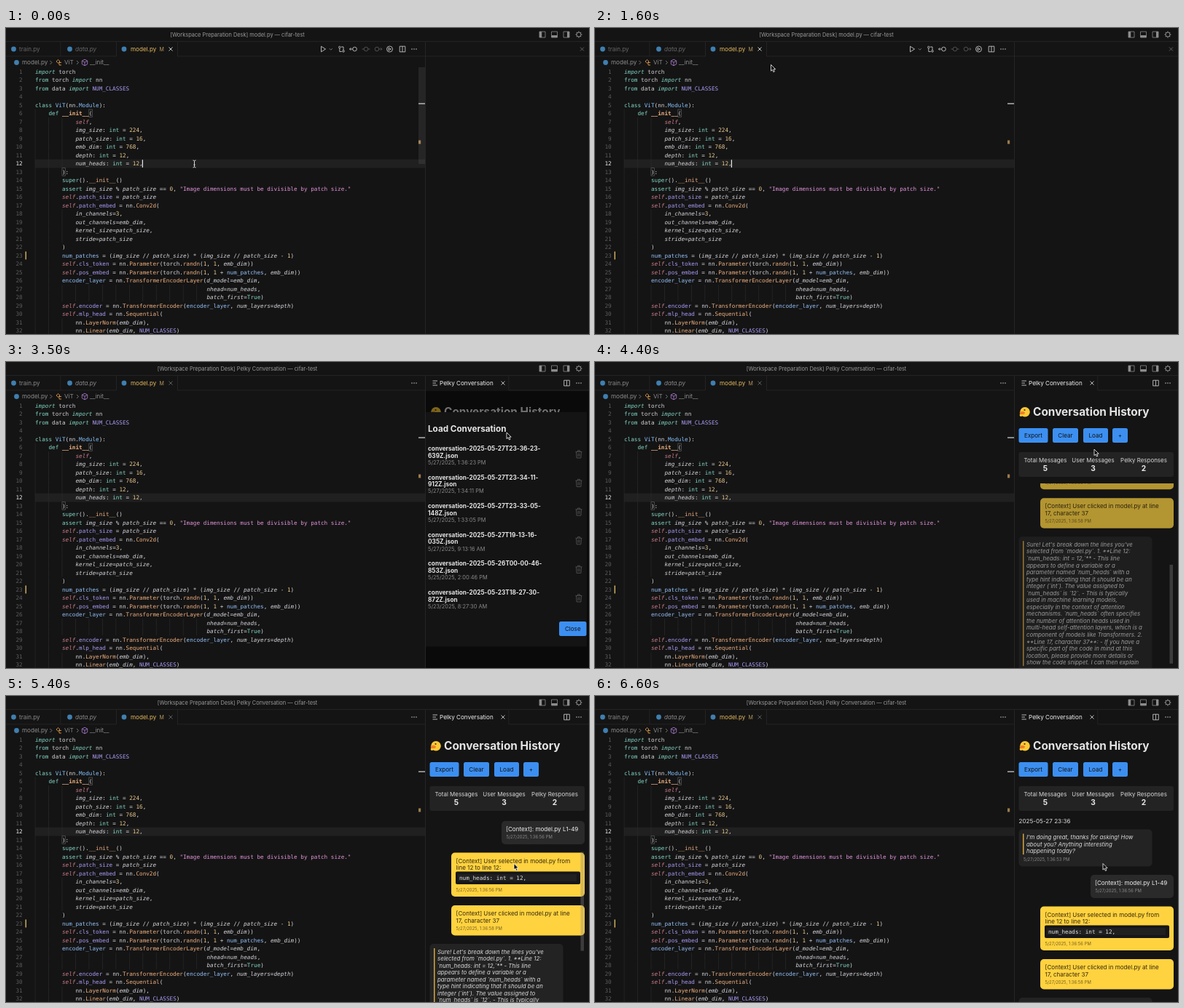
Animation of 800 by 421 pixels, one loop 6700 ms. Source, as an HTML page:

```html
<!DOCTYPE html>
<html lang="en">
<head>
<meta charset="utf-8">
<title>Editor with conversation panel</title>
<style>
html, body { margin: 0; width: 100%; height: 100%; overflow: hidden; background: #141414; }
svg { display: block; width: 800px; height: 421px; }
text { font-family: Inter, "Open Sans", sans-serif; white-space: pre; }
text.mono { font-family: "DejaVu Sans Mono", monospace; }
</style>
</head>
<body>
<svg id="stage" viewBox="0 0 800 421" xmlns="http://www.w3.org/2000/svg"></svg>
<script>
const LOOP = 6700;
const PANEL_OPEN = 1900, DIALOG_OPEN = 3100, LOADED = 4250;
const SCROLL_START = 5150, SCROLL_TIME = 1000, SCROLL_MAX = 176;
const BG = "#141414", LINE = "#272727", GREY = "#8c8c8c", BLUE = "#3c8ff0", YELLOW = "#ffd23f", PY = "#3f7fb0";
const MONO = 7.67, CHAR = MONO * 0.602, ROW = 11.5, LEFT = 40;

const CODE = `import torch
from torch import nn
from data import NUM_CLASSES

class ViT(nn.Module):
    def __init__(
            self,
            img_size: int = 224,
            patch_size: int = 16,
            emb_dim: int = 768,
            depth: int = 12,
            num_heads: int = 12,
        ):
        super().__init__()
        assert img_size % patch_size == 0, "Image dimensions must be divisible by patch size."
        self.patch_size = patch_size
        self.patch_embed = nn.Conv2d(
            in_channels=3,
            out_channels=emb_dim,
            kernel_size=patch_size,
            stride=patch_size
        )
        num_patches = (img_size // patch_size) * (img_size // patch_size - 1)
        self.cls_token = nn.Parameter(torch.randn(1, 1, emb_dim))
        self.pos_embed = nn.Parameter(torch.randn(1, 1 + num_patches, emb_dim))
        encoder_layer = nn.TransformerEncoderLayer(d_model=emb_dim,
                                                   nhead=num_heads,
                                                   batch_first=True)
        self.encoder = nn.TransformerEncoder(encoder_layer, num_layers=depth)
        self.mlp_head = nn.Sequential(
            nn.LayerNorm(emb_dim),
            nn.Linear(emb_dim, NUM_CLASSES)`.split("\n");

const ITALIC = 'font-style="italic"';
const RULES = [
  ['"[^"]*"', "#e394dc"],
  ["\\bself\\b", "#cc7c8a", ITALIC],
  ["\\bimport\\b", "#83d6c5", ITALIC],
  ["\\b(?:from|class|def|assert|int|super|True)\\b", "#83d6c5"],
  ["(?<=def )__init__", "#efb080", 'font-weight="bold"'],
  ["\\bNUM_CLASSES\\b|(?<=self\\.)\\w+", "#aa9bf5"],
  ["\\b(?:ViT|Module)\\b", "#87c3ff"],
  ["\\b[A-Za-z_]\\w*(?=\\()", "#efb080"],
  ["\\b\\w+(?==)", "#d6d6dd", ITALIC],
  ["\\b(?:num_patches|encoder_layer)\\b", "#94c1fa"],
  ["\\b(?:img_size|patch_size|emb_dim|depth|num_heads)\\b", "#d6d6dd", ITALIC],
  ["\\b\\d+\\b", "#ebc88d"]
];
const TOKENS = new RegExp(RULES.map(r => `(${r[0]})`).join("|"), "g");

const highlight = src => src.replace(TOKENS, (word, ...groups) => {
  const [, fill, style = ""] = RULES[groups.findIndex(g => g !== undefined)];
  return `<tspan fill="${fill}" ${style}>${word}</tspan>`;
});

const text = (x, y, s, size, fill, extra = "") =>
  `<text x="${x}" y="${y}" font-size="${size}" fill="${fill}" ${extra}>${s}</text>`;
const mono = (x, y, s, fill, extra = "") => text(x, y, s, MONO, fill, `class="mono" ${extra}`);
const rect = (x, y, w, h, fill, extra = "") =>
  `<rect x="${x}" y="${y}" width="${w}" height="${h}" fill="${fill}" ${extra}/>`;
const dot = (x, y, r, fill) => `<circle cx="${x}" cy="${y}" r="${r}" fill="${fill}"/>`;
const stroke = (d, color, width = 0.9) =>
  `<path d="${d}" fill="none" stroke="${color}" stroke-width="${width}"/>`;
const group = (id, body, extra = "") => `<g id="${id}" ${extra}>${body}</g>`;
const ring = (x, y, r) => `M${x - r} ${y}a${r} ${r} 0 1 0 ${2 * r} 0a${r} ${r} 0 1 0 ${-2 * r} 0`;
const cross = (x, y, color) => stroke(`M${x - 2.5} ${y - 2.5}l5 5m0 -5l-5 5`, color);
const dots = (x, y) => [-3, 0, 3].map(d => dot(x + d, y, 0.8, "#bbb")).join("");
const MIDDLE = 'text-anchor="middle"', BOLD = 'font-weight="700"';

function button(x, y, w, label) {
  return rect(x, y, w, 20, BLUE, 'rx="2.5"') + text(x + w / 2, y + 12.9, label, 8.1, "#101418", MIDDLE);
}

function codeArea() {
  let out = rect(LEFT, 180.7, 535, 11.8, "#202020");
  CODE.forEach((line, i) => {
    const mid = 60 + i * ROW, indent = line.search(/\S|$/);
    for (let col = 0; col < indent; col += 4)
      out += rect(LEFT + col * CHAR - 0.3, mid - ROW / 2, 0.7, ROW, "#2a2a2a");
    out += mono(22.7, mid + 2.8, i + 1, i === 11 ? "#f0f0f0" : "#5c5c5c", 'text-anchor="end"');
    out += mono(LEFT + indent * CHAR, mid + 2.8, highlight(line.trim()), "#d6d6dd");
  });
  const bracket = (col, y) => rect(LEFT + col * CHAR, y, CHAR, 10.5, "none", 'stroke="#6a6a6a" stroke-width=".6"');
  return out + bracket(16, 112) + bracket(8, 192.7) + rect(26.5, 307.5, 1.5, 11, "#c9a95f")
    + rect(566, 103.3, 9, 1.6, "#a8a8a8") + rect(566, 154.5, 3.2, 5, "#9a7b4a");
}

function layoutIcons() {
  const box = x => stroke(`M${x - 4} 5h8v8h-8z`, GREY, 0.8);
  const teeth = [0, 45, 90, 135].map(a =>
    `<path d="M786 4.6v8.8" stroke="${GREY}" stroke-width="1.3" transform="rotate(${a} 786 9)"/>`).join("");
  return box(736) + rect(732, 5, 3.2, 8, GREY) + box(752.5) + rect(748.5, 10, 8, 3, GREY)
    + box(769) + rect(770, 5, 3, 8, GREY) + teeth + dot(786, 9, 2.9, BG) + stroke(ring(786, 9, 3), GREY);
}

function editorChrome() {
  return rect(0, 18.2, 800, 0.8, LINE) + rect(0, 38.5, 151, 0.8, LINE) + rect(235, 38.5, 565, 0.8, LINE)
    + [74.5, 151, 235].map(x => rect(x, 19, 0.8, 20, LINE)).join("")
    + rect(575, 19, 0.9, 402, LINE) + layoutIcons() + dots(560, 29)
    + [[10.5, 29], [87.5, 29], [162, 29], [14.5, 47.5]].map(p => dot(...p, 3.4, PY)).join("")
    + group("idleTabs", text(18, 32, "train.py", 8.1, "currentColor") + text(95, 32, "data.py", 8.1, "currentColor", ITALIC))
    + text(171, 32, "model.py", 8.1, "#e5b95c") + text(210.5, 32, "M", 7, "#b7985a")
    + group("tabClose", cross(226, 29, "currentColor"))
    + text(22, 50.4, "model.py", 8.1, GREY) + stroke("M60.5 45l2.5 2.5l-2.5 2.5M97 45l2.5 2.5l-2.5 2.5", GREY, 0.8)
    + stroke("M69 46l2.5 -2.5l2.5 2.5l-2.5 2.5zM72 47.5h4M73 47.5v3.5h3", "#dd9a4c")
    + text(80, 50.4, "ViT", 8.1, GREY)
    + stroke("M108 43.2l3.7 2v4.6l-3.7 2l-3.7 -2v-4.6zM104.3 45.2l3.7 2l3.7 -2M108 47.2v4.6", "#b180d7", 0.8)
    + text(115, 50.4, "__init__", 8.1, GREY);
}

function toolbar() {
  const c = "#c2c2c2", faint = "#555";
  return stroke("M432.5 25.2v7.6l6 -3.8z", c) + stroke("M443.8 28.2l2 2l2 -2", GREY, 0.8)
    + stroke(ring(457.8, 26.5, 1.3) + ring(463, 31.8, 1.3) + "M457.8 28v4.5h3M463 30v-4h-3", c)
    + stroke(ring(478.5, 29, 2.8) + "M475.5 29h-4m1.8 -1.8l-1.8 1.8l1.8 1.8", c)
    + stroke(ring(494, 29, 2.8) + "M488.5 29h2.5M497 29h2.5", faint)
    + stroke(ring(509, 29, 2.8) + "M512 29h4m-1.8 -1.8l1.8 1.8l-1.8 1.8", faint)
    + stroke(ring(526.5, 29, 4) + "M525 27v4l3.3 -2z", c)
    + stroke("M540.2 25.2h7.6v7.6h-7.6zM544 25.2v7.6", c) + cross(790.5, 29, "#666");
}

const chick = dot(590, 68.8, 6.8, "#fcc934") + dot(584.6, 73, 2, "#fcc934")
  + '<ellipse cx="586.3" cy="70" rx="3.6" ry="2" fill="#ef7d2b"/>' + dot(589.5, 66, 1.1, "#3a2a1c");

function panelChrome() {
  const stats = [[618, "Total Messages"], [683.5, "User Messages"], [753, "Pelky Responses"]];
  return rect(576, 37.5, 114, 2.5, BG) + rect(689.5, 19, 0.8, 20, LINE)
    + stroke("M585.5 26h6.5M585.5 29h4.5M585.5 32h6.5", "#c8c8c8")
    + text(595, 32, "Pelky Conversation", 8.1, "#f0f0f0") + cross(682, 29, "#ccc")
    + stroke("M765.7 25.2h7.6v7.6h-7.6zM769.5 25.2v7.6", "#c2c2c2") + dots(786, 29)
    + chick + text(601, 74.4, "Conversation History", 15.4, "#e4e4e4", BOLD)
    + button(581.5, 91, 40, "Export") + button(628, 91, 35, "Clear") + button(670, 91, 34, "Load") + button(710, 91, 21, "+")
    + rect(581.5, 124, 212.5, 34, "#232323", 'rx="3"')
    + stats.map(([x, label], i) => text(x, 138, label, 7.95, "#d8d8d8", MIDDLE)
      + text(x, 149.8, "0", 10.2, "#e8e8e8", `${MIDDLE} ${BOLD} id="stat${i}"`)).join("");
}

function messages() {
  const lines = (x, y, list, size, fill, extra) => list.map((s, i) => text(x, y + i * 9.55, s, size, fill, extra)).join("");
  const stamp = (x, y, s, fill = "#8a8a8a") => text(x, y, `5/27/2025, 1:36:${s} PM`, 5.9, fill);
  const card = (x, y, w, h, fill) => rect(x, y, w, h, fill, 'rx="5"');
  const reply = (y, h, list) => card(581.5, y, 183, h, "#232323") + rect(587, y + 6, 1.5, list.length * 9.55, "#d4a640")
    + lines(592, y + 13.6, list, 7.85, "#dcdcdc", ITALIC);
  const onYellow = (y, s) => stamp(617.5, y, s, "#75601f");
  return text(581.5, 175.2, "2025-05-27 23:36", 8.1, "#dcdcdc")
    + reply(183.5, 51, ["I'm doing great, thanks for asking! How", "about you? Anything interesting", "happening today?"])
    + stamp(588, 227, 53)
    + card(680, 246, 114, 32, "#2a2a2a") + text(686, 260.2, "[Context]: model.py L1-49", 8.1, "#f0f0f0") + stamp(686.5, 270.2, 56)
    + card(611, 289.5, 183, 60.5, YELLOW)
    + lines(617.5, 303.6, ["[Context] User selected in model.py from", "line 12 to line 12:"], 8.05, "#33290d")
    + rect(617, 315.5, 171, 17.5, "#161616", 'rx="2"') + rect(620, 319, 163, 10, "#202020")
    + mono(622, 327, "num_heads: int = 12,", "#e2e2e2") + onYellow(342.5, 56)
    + card(611, 362, 183, 41.5, YELLOW)
    + lines(617.5, 376.2, ["[Context] User clicked in model.py at line", "17, character 37"], 8.05, "#33290d") + onYellow(396, 58)
    + reply(415, 200, [
      "Sure! Let's break down the lines you've", "selected from `model.py`. 1. **Line 12:",
      "`num_heads: int = 12,`** - This line", "appears to define a variable or a",
      "parameter named `num_heads` with a", "type hint indicating that it should be an",
      "integer (`int`). The value assigned to", "`num_heads` is `12`. - This is typically",
      "used in machine learning models,", "especially in the context of attention",
      "mechanisms. `num_heads` often specifies", "the number of attention heads used in",
      "multi-head self-attention layers, which is a", "component of models like Transformers. 2.",
      "**Line 17, character 37**: - If you have a", "specific part of the code in mind at this",
      "location, please provide more details or", "show the code snippet. I can then explain"]);
}

function dialog() {
  const saved = [
    ["27T23-36-23-", "639", "27/2025, 1:36:23 PM"], ["27T23-34-11-", "912", "27/2025, 1:34:11 PM"],
    ["27T23-33-05-", "148", "27/2025, 1:33:05 PM"], ["27T19-13-16-", "035", "27/2025, 9:13:16 AM"],
    ["26T00-00-46-", "853", "25/2025, 2:00:46 PM"], ["23T18-27-30-", "872", "23/2025, 8:27:30 AM"]];
  return rect(576, 40, 224, 381, "#000", 'opacity=".5"') + rect(576, 69, 221, 322.5, BG)
    + text(579, 95.6, "Load Conversation", 11.7, "#e6e6e6", BOLD)
    + saved.map(([stem, tail, date], i) => {
      const y = 122 + i * 39.6;
      return text(579, y, "conversation-2025-05-" + stem, 8.25, "#e6e6e6", BOLD)
        + text(579, y + 9.5, tail + "Z.json", 8.25, "#e6e6e6", BOLD) + text(579, y + 18.8, "5/" + date, 7.4, "#8a8a8a")
        + stroke(`M781.5 ${y + 1.5}h9m-6 0v-1.7h3v1.7m-5 0l.6 8.5h5.8l.6 -8.5m-4.5 2v4.5m2 0v-4.5`, "#4c4c4c", 1);
    }).join("") + button(759, 357, 37.5, "Close");
}

const stage = document.getElementById("stage");
stage.innerHTML = '<clipPath id="feed"><rect x="576" y="167" width="224" height="254"/></clipPath>'
  + rect(0, 0, 800, 421, BG) + codeArea() + group("editorThumb", rect(566, 54, 9, 133, "#fff", 'opacity=".07"'))
  + group("caret", rect(186.8, 181.3, 1.1, 10.6, "#fff")) + editorChrome()
  + text(317.5, 11.8, "", 7.4, "#9a9a9a", `${MIDDLE} id="title"`)
  + group("tools", toolbar())
  + group("panel", panelChrome() + `<g clip-path="url(#feed)">${group("messages", messages())}</g>`
    + rect(788.5, 166, 4.5, 136, "#888", 'id="feedThumb"') + group("dialog", dialog()))
  + group("arrow", '<path d="M0 0v8.6l2 -1.8l1.4 3.2l1.5 -.7l-1.4 -3.1h2.7z" fill="#000" stroke="#fff" stroke-width=".8"/>')
  + group("beam", stroke("M-2 -5q2 0 2 1.5v7q0 1.5 -2 1.5M2 -5q-2 0 -2 1.5v7q0 1.5 2 1.5M-1.2 1.2h2.4", "#ddd"));

const el = {};
stage.querySelectorAll("[id]").forEach(node => el[node.id] = node);

const clamp = v => Math.min(1, Math.max(0, v));
const span = (t, start, length) => clamp((t - start) / length);
const smooth = p => p * p * (3 - 2 * p);
const show = (node, on) => node.setAttribute("display", on ? "inline" : "none");
const move = (node, x, y) => node.setAttribute("transform", `translate(${x} ${y})`);

// Pointer stops: time, x, y
const STOPS = [[0, 258.5, 187], [500, 258.5, 187], [1400, 241.5, 50.5], [1750, 241.5, 50.5], [2800, 687, 97],
  [3550, 687, 97], [3900, 685, 120], [4450, 685, 120], [5000, 697, 230.5], [LOOP, 697, 230.5]];

function pointerAt(t) {
  const i = STOPS.findIndex(s => s[0] > t);
  const [t0, x0, y0] = STOPS[i - 1], [t1, x1, y1] = STOPS[i];
  const p = smooth((t - t0) / (t1 - t0));
  return [x0 + (x1 - x0) * p, y0 + (y1 - y0) * p];
}

function update(t) {
  const open = t >= PANEL_OPEN, loaded = t >= LOADED;
  el.title.textContent = `[Workspace Preparation Desk] ${open ? "Pelky Conversation" : "model.py"} — cifar-test`;
  el.idleTabs.style.color = open ? "#8a8a8a" : "#666";
  el.tabClose.style.color = open ? "#666" : "#ddd";
  show(el.tools, !open);
  show(el.caret, !open);
  show(el.panel, open);
  show(el.dialog, t >= DIALOG_OPEN && !loaded);
  el.editorThumb.setAttribute("opacity", 1 - span(t, 700, 500));

  [5, 3, 2].forEach((n, i) => el["stat" + i].textContent = loaded ? n : 0);
  const fade = 1 - (1 - span(t, LOADED, 350)) ** 2;
  const scroll = SCROLL_MAX * (1 - span(t, SCROLL_START, SCROLL_TIME)) ** 3;
  el.messages.setAttribute("opacity", fade);
  move(el.messages, 0, 4 * (1 - fade) - scroll);
  el.feedThumb.setAttribute("y", 168 + scroll * 0.63);
  const thumb = t < SCROLL_START ? 1 - span(t, 4600, 300) : 1 - span(t, 6100, 300);
  el.feedThumb.setAttribute("opacity", loaded ? 0.35 * thumb : 0);

  const [x, y] = pointerAt(t);
  const overText = x < 575 && y > 53;
  show(el.beam, overText);
  show(el.arrow, !overText);
  move(overText ? el.beam : el.arrow, x, y);
}

const start = performance.now();
function tick() {
  update((performance.now() - start) % LOOP);
  requestAnimationFrame(tick);
}
tick();
</script>
</body>
</html>
```
